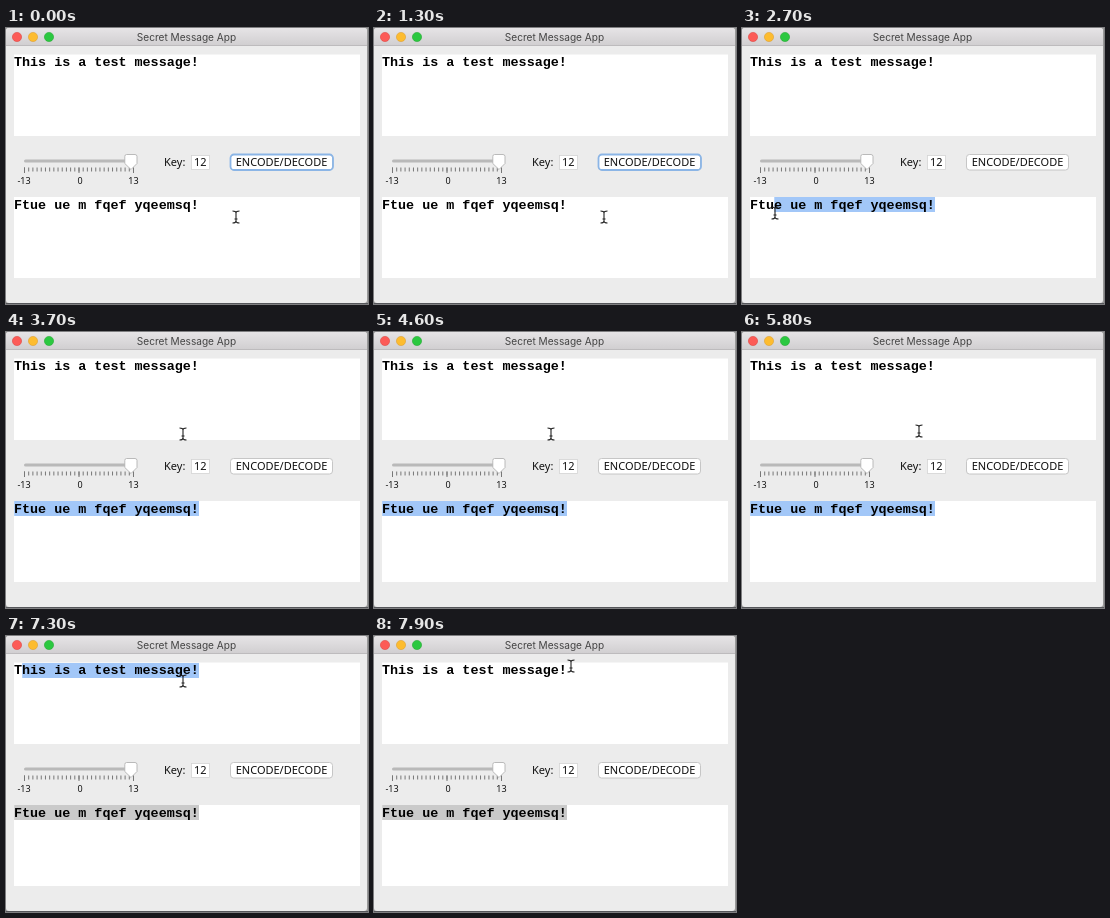
Recreate the animation shown at these times as an HTML page. Size 362x276 px, loop 8 s.

```html
<!DOCTYPE html>
<html lang="en">
<head>
<meta charset="utf-8">
<title>Secret Message App</title>
<style>
  html, body { margin: 0; width: 100%; height: 100%; overflow: hidden; background: #999; }
  svg { display: block; width: 362px; height: 276px; }
  text { white-space: pre; }
  .title { font: 10.1px Inter, sans-serif; fill: #444; text-anchor: middle; }
  .ui { font: 11px "Noto Sans", "Open Sans", sans-serif; fill: #111; }
  .tick { font-size: 9px; text-anchor: middle; }
  .mono { font: bold 13.4px "Liberation Mono", monospace; }

  .anim { animation: 8s infinite step-end; }
  .ring { animation-name: ring; }
  .caret { animation-name: caret; }
  .top { fill: #a2c7f8; animation-name: select-top; }
  .bottom { animation-name: select-bottom; }
  .pointer { animation-name: move; }
  .beam { animation-name: beam; }
  .arrow { animation-name: arrow; }

  @keyframes ring { 0% { opacity: 1 } 22.5%, 100% { opacity: 0 } }
  @keyframes caret { 0% { opacity: 0 } 22.5% { opacity: 1 } 30%, 100% { opacity: 0 } }

  @keyframes select-bottom {
    0% { width: 0; fill: #a2c7f8 }
    28.75% { width: 0; animation-timing-function: steps(4) }
    33.75% { width: 20ch }
    36.25% { width: 22ch }
    37.5% { width: 23ch; fill: #a2c7f8 }
    76.25%, 100% { width: 23ch; fill: #cacaca }
  }
  @keyframes select-top {
    0% { width: 0 }
    77.5% { width: 2ch }
    78.75% { width: 4ch }
    80% { width: 23ch }
    85% { width: 22ch }
    96.25%, 100% { width: 0 }
  }

  /* The pointer advances ten times a second. */
  @keyframes move {
    0% { transform: translate(230px, 189px) }
    17.5% { transform: translate(230px, 189px); animation-timing-function: steps(3) }
    21.25% { transform: translate(197px, 179px) }
    23.75% { transform: translate(197px, 179px); animation-timing-function: steps(2) }
    26.25% { transform: translate(198px, 186px) }
    28.75% { transform: translate(198px, 186px); animation-timing-function: steps(4) }
    33.75% { transform: translate(33px, 185px) }
    35% { transform: translate(33px, 185px); animation-timing-function: steps(2) }
    37.5% { transform: translate(4px, 185px) }
    40% { transform: translate(4px, 185px); animation-timing-function: steps(5) }
    46.25% { transform: translate(177px, 102px) }
    72.5% { transform: translate(177px, 99px); animation-timing-function: steps(3) }
    76.25% { transform: translate(196px, 36px); animation-timing-function: steps(4) }
    81.25% { transform: translate(126px, 20px) }
    82.5% { transform: translate(126px, 20px); animation-timing-function: steps(3) }
    86.25% { transform: translate(154px, 36px) }
    88.75% { transform: translate(154px, 36px); animation-timing-function: steps(2) }
    91.25% { transform: translate(177px, 45px); animation-timing-function: steps(4) }
    96.25% { transform: translate(197px, 32px); animation-timing-function: steps(2) }
    98.75%, 100% { transform: translate(197px, 30px) }
  }
  @keyframes beam { 0% { opacity: 1 } 80% { opacity: 0 } 85%, 100% { opacity: 1 } }
  @keyframes arrow { 0% { opacity: 0 } 80% { opacity: 1 } 85%, 100% { opacity: 0 } }
</style>
</head>
<body>
<svg viewBox="0 0 362 276">
  <defs>
    <linearGradient id="bar" x2="0" y2="1">
      <stop stop-color="#e6e4e6"/>
      <stop offset="1" stop-color="#d1cfd1"/>
    </linearGradient>
  </defs>

  <!-- Window -->
  <rect width="361" height="275" rx="3" fill="#ececec"/>
  <path d="M0 17V3Q0 0 3 0H358Q361 0 361 3V17Z" fill="url(#bar)"/>
  <path d="M0 17.5H361" stroke="#bdbbbd"/>
  <path d="M0 275.5H362" stroke="#55565a"/>
  <g stroke-width=".6">
    <circle cx="11" cy="9" r="4.6" fill="#fc5b57" stroke="#df4744"/>
    <circle cx="27" cy="9" r="4.6" fill="#fdbc2f" stroke="#de9f34"/>
    <circle cx="43" cy="9" r="4.6" fill="#2bc840" stroke="#27aa35"/>
  </g>
  <text class="title" x="180.5" y="13">Secret Message App</text>

  <!-- Messages -->
  <path d="M8 26.500H354V108H8ZM8 169H354V250H8Z" fill="#fff"/>
  <g class="mono">
    <g transform="translate(193 0) scale(-1 1)">
      <rect class="anim top" y="27" width="0" height="15"/>
      <rect class="anim bottom" y="169" width="0" height="15"/>
    </g>
    <text x="8" y="38">This is a test message!</text>
    <text x="8" y="181">Ftue ue m fqef yqeemsq!</text>
    <rect class="anim caret" x="193" y="170" width="1" height="14"/>
  </g>

  <!-- Slider -->
  <rect x="18" y="131.500" width="110" height="3" rx="1.500" fill="#b9b9b9"/>
  <path d="M18 141.500H128.500" stroke="#777" stroke-width="4" stroke-dasharray="1 3.192"/>
  <path d="M18.500 139.500V145M73 139.500V145M127.500 139.500V145" stroke="#777"/>
  <path d="M120.500 126.500H129Q131 126.500 131 128.500V135.500L125 141.500L118.800 135.500V128.500Q118.800 126.500 120.500 126.500Z"
        fill="#fff" stroke="#b4b4b4" stroke-width=".9"/>
  <g class="ui">
    <text class="tick" x="18" y="156">-13</text>
    <text class="tick" x="74" y="156">0</text>
    <text class="tick" x="127.500" y="156">13</text>

    <!-- Key and button -->
    <text x="158" y="138">Key:</text>
    <rect x="185.500" y="127.500" width="18" height="14" fill="#fff" stroke="#d4d4d4" stroke-width=".8"/>
    <text x="188" y="138">12</text>
    <rect x="224.500" y="126.500" width="102" height="15.500" rx="3" fill="#fff" stroke="#c6c6c6"/>
    <rect class="anim ring" x="224.500" y="126.500" width="102.500" height="15.500" rx="3.500"
          fill="none" stroke="#8bb5e6" stroke-width="1.800"/>
    <text x="275.500" y="138" text-anchor="middle">ENCODE/DECODE</text>
  </g>

  <!-- Pointer -->
  <g class="anim pointer">
    <path class="anim beam" d="M-3.500 -6Q0 -6 0 -4V4Q0 6 -3.500 6M3.500 -6Q0 -6 0 -4M3.500 6Q0 6 0 4M-1.500 2H1.500"
          fill="none" stroke="#222" stroke-width="1.100"/>
    <path class="anim arrow" d="M-1 -5V5.500L1.400 3.300L3 6.800L4.700 6L3.200 2.600H6.400Z"
          stroke="#fff" stroke-width=".8"/>
  </g>
</svg>
</body>
</html>
```
